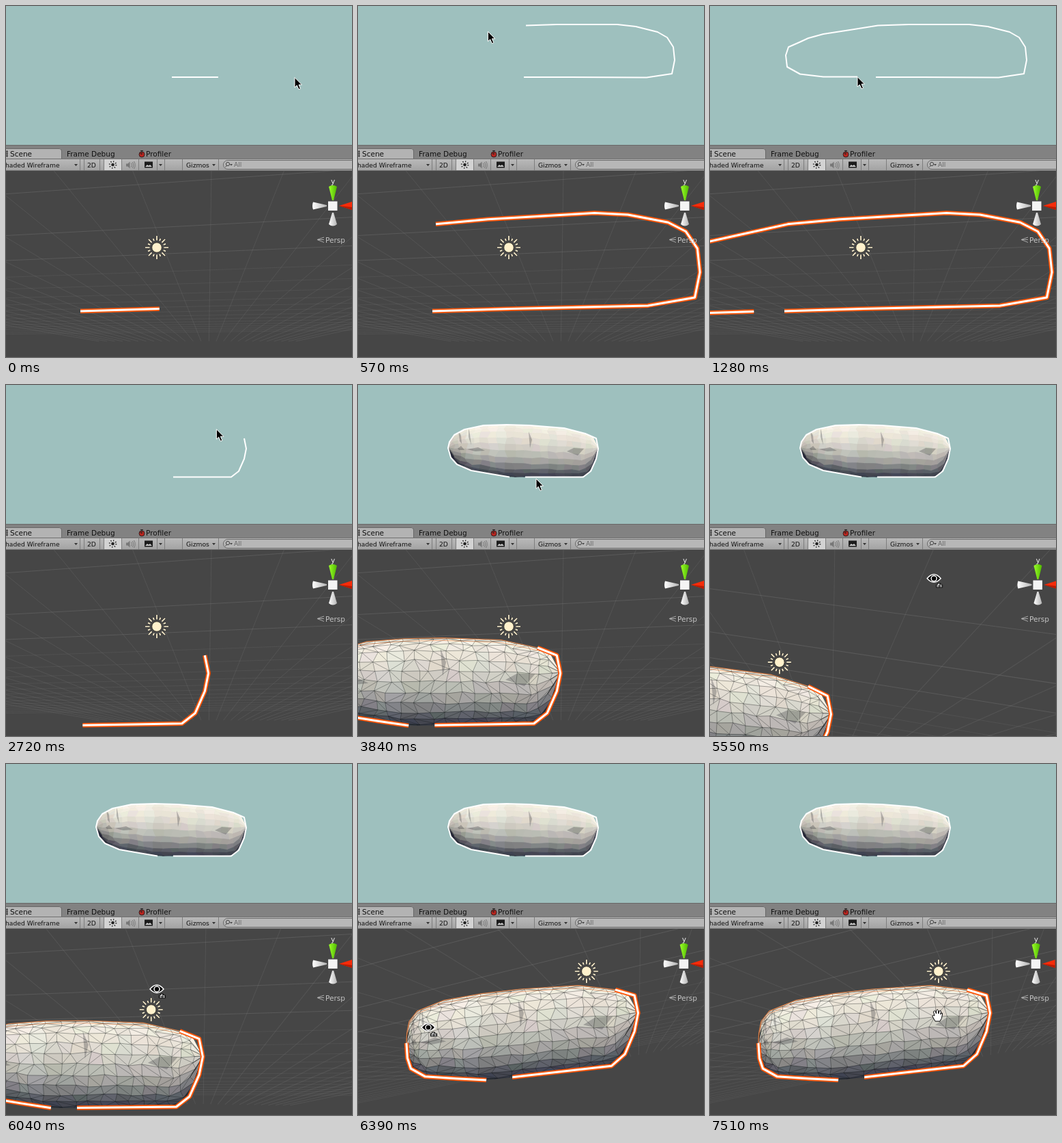
These frames come from a looping animation (507 by 513 pixels, 7.99 s). An HTML page with a canvas:

```html
<!DOCTYPE html>
<html lang="en">
<head>
<meta charset="utf-8">
<title>Sketch to mesh</title>
<style>
html, body { margin: 0; width: 100%; height: 100%; overflow: hidden; background: #464646; }
canvas, svg { position: absolute; left: 0; top: 0; width: 507px; height: 513px; }
text { font-family: "DejaVu Sans", sans-serif; font-size: 10.5px; fill: #111; }
.bar text { font-size: 9.2px; }
</style>
</head>
<body>
<canvas id="view" width="507" height="513"></canvas>
<svg viewBox="0 0 507 513">
  <defs>
    <linearGradient id="strip" x2="0" y2="1"><stop stop-color="#b9b9b9"/><stop offset="1" stop-color="#a2a2a2"/></linearGradient>
    <linearGradient id="cone"><stop stop-color="#fff"/><stop offset="1" stop-color="#b4b4b4"/></linearGradient>
    <linearGradient id="green"><stop stop-color="#9cff2a"/><stop offset="1" stop-color="#4fb800"/></linearGradient>
  </defs>
  <rect y="203" width="507" height="21" fill="#828282"/>
  <path d="M0 203.5H507" stroke="#686868"/>
  <path d="M0 208H78Q81 208 81 211V224H0Z" fill="#b3b3b3"/>
  <path d="M0 208.5H78Q81.500 208.500 81.500 212V224" fill="none" stroke="#686868"/>
  <path d="M0 213H3M0 216H3M0 219H3M1.500 211V221" stroke="#333"/>
  <text x="6" y="219.500">Scene</text>
  <text x="89" y="219.500">Frame Debug</text>
  <text x="205" y="219.500" font-size="11">Profiler</text>
  <circle cx="199" cy="217" r="4" fill="#b8241e" stroke="#3a2020"/>
  <path d="M197 211.500H201M199 212V217L196 214.500" stroke="#222" fill="none"/>
  <g class="bar">
    <rect y="224" width="507" height="17" fill="url(#strip)"/>
    <path d="M0 223.500H507M0 240.500H507" stroke="#707070"/>
    <rect x="144" y="224" width="25" height="16" fill="#d3d3d3"/>
    <path d="M108.500 224V240M114.500 224V240M137.500 224V240M143.500 224V240M169.500 224V240M194.500 224V240M221.500 224V240M232.500 224V240M258.500 224V240M311.500 224V240" stroke="#7d7d7d"/>
    <text x="-1" y="235.500">haded Wireframe</text>
    <text x="119" y="235.500">2D</text>
    <text x="264" y="235.500">Gizmos</text>
    <path d="M100 231h5l-2.500 3zM224 231h5l-2.500 3zM302 231h5l-2.500 3z" fill="#333"/>
    <circle cx="156.500" cy="232" r="2.300" fill="#222"/>
    <circle cx="156.500" cy="232" r="4.800" fill="none" stroke="#222" stroke-width="2" stroke-dasharray="1.200 2.570"/>
    <path d="M176 230.500h2.500l3-3v10l-3-3H176z" fill="#777"/>
    <path d="M183.500 229.500q2 3 0 6M185.500 228q3 4.500 0 9M187.500 227q3.500 5.500 0 11" fill="none" stroke="#777"/>
    <rect x="203" y="227.500" width="12" height="9" fill="#1c1c1c"/>
    <path d="M204 235l3-3 2 1.500 2-1.500 3 3z" fill="#ccc"/>
    <path d="M507 225.500H325a6.500 6.500 0 0 0 0 13H507" fill="#b7b7b7" stroke="#6a6a6a"/>
    <circle cx="325" cy="231" r="2.600" fill="none" stroke="#444"/>
    <path d="M323.500 233l-2 2.500" stroke="#444"/><path d="M328 231h4l-2 2.500z" fill="#444"/>
    <text x="334" y="235" style="fill:#666">All</text>
  </g>
  <g id="gizmo">
    <text x="476" y="259.500" style="fill:#eee">y</text>
    <path d="M473 264Q479 260 485 264L480 284H478Z" fill="url(#green)"/>
    <path d="M450 286.500Q448 292 450 297.500L470 293V291Z" fill="url(#cone)"/>
    <path d="M478 302H480L485 319Q479 324 473 319Z" fill="url(#cone)"/>
    <path d="M488 292L507 286V298Z" fill="#f52c0a"/><path d="M488 292L507 294V298Z" fill="#b81c04"/>
    <rect x="472" y="285.500" width="13.500" height="13.500" fill="#f4f4f4"/>
  </g>
  <path d="M466 338L456 341.500L466 345.500M466 341.500H456" fill="none" stroke="#a8a8a8"/>
  <text x="468" y="345.500" style="fill:#c4c4c4">Persp</text>
  <path id="arrow" d="M0 0V14.500L3.300 11.500L6 17.500L8.500 16.400L6 10.600H10.500Z" fill="#000" stroke="#fff"/>
  <g id="eye">
    <path d="M-10 0Q0 -12 10 0Q0 11 -10 0Z" fill="#000" stroke="#fff" stroke-width="1.400"/>
    <circle r="4" fill="#000" stroke="#fff" stroke-width="1.500"/>
    <path d="M5.500 7h4v2h3v4h-9v-4h2z" fill="#fff" stroke="#000"/>
    <path d="M8 7.500V13M4 11H12" stroke="#000"/>
  </g>
  <path id="hand" d="M-3 9L-7 2Q-7 -1 -4 1L-5.500 -5Q-4 -8 -2.500 -5L-1.500 -2L-1.500 -7Q0 -9.500 1.500 -7L1.700 -2L3 -6Q5 -8 5.500 -5L4.800 -1L6 -3Q8 -4 7.500 -1Q7 5 4 9Z" fill="#fff" stroke="#000"/>
</svg>
<script>
const LOOP = 7990;
const $ = id => document.getElementById(id);
const ctx = $('view').getContext('2d');

// start, end and number of steps of each burst of motion
const bursts = [[60, 800, 13], [860, 1280, 8], [1690, 2480, 13], [2540, 3310, 14], [3370, 3370, 1],
  [3550, 3550, 1], [3840, 4610, 13], [4670, 4780, 3], [5200, 5990, 14], [6040, 6500, 9], [6740, 7040, 5], [7400, 7510, 3]];

const strokeA = [[243, 104], [311, 104], [423, 104.5], [460, 99], [464, 79], [462, 60], [453, 46], [439, 38],
  [407, 30], [380, 27], [291, 27], [246, 28.5], [205, 35], [166, 41], [144, 47], [131, 53], [115, 60],
  [111, 72], [113, 89], [132, 99.5], [166, 103.5], [216, 103.5], [216, 103.5]];
const strokeB = [[245, 134.5], [290, 134.5], [330, 134.5], [341, 126], [349, 108], [352, 93], [349, 78], [333, 71],
  [302, 63], [252, 59], [218, 58], [184, 59], [156, 65], [141, 73], [134, 83], [132, 92], [136, 106],
  [145, 116], [166, 125], [195, 130], [222, 134.5], [228, 133]];

const drawA = [[0, 2], [800, 17], [1280, 22]];
const drawB = [[2300, 0], [2480, 3], [2718, 7.8], [3370, 21]];
const arrowPath = [[1280, 216, 103.5], [1690, 218, 106], [2300, 245, 134]];
const arrowExit = [[3370, 228, 133], [3800, 228, 133], [3840, 261, 137], [4250, 408, 180], [4610, 284, 238], [4780, 219, 319]];
const eyePath = [[5200, 215, 333], [5564, 328, 283], [5760, 372, 226], [6040, 221, 329], [6380, 103, 385]];
const handPath = [[6500, 138, 357], [6740, 138, 357], [7040, 240, 390], [7350, 240, 390], [7510, 333, 367]];

const mix = (a, b, p) => a.map((v, i) => v + (b[i] - v) * p);

function snap(t) {
  let out = 0;
  for (const [a, b, n] of bursts) {
    if (t < a) break;
    const d = (b - a) / (n - 1) || 1;
    out = a + Math.min(n - 1, Math.floor((t - a) / d + 0.3)) * d;
  }
  return out;
}

function keyed(table, t) {
  if (t <= table[0][0]) return table[0].slice(1);
  for (let i = 1; i < table.length; i++) {
    const a = table[i - 1], b = table[i];
    if (t <= b[0]) return mix(a, b, (t - a[0]) / (b[0] - a[0])).slice(1);
  }
  return table[table.length - 1].slice(1);
}

function pointAt(pts, i) {
  const k = Math.min(pts.length - 2, Math.floor(i));
  return mix(pts[k], pts[k + 1], Math.min(1, i - k));
}

// from the flat drawing into the tilted scene view
function toScene([x, y]) {
  const t = x - 243, far = Math.min(0, t + 67);
  return [109 + 1.67 * t + 0.00047 * t * t + 0.0143 * far * far,
    446 - 0.05 * t + (y - 104) * (1.68 + 0.0007 * t)];
}
const flat = p => p;

function trace(pts) {
  ctx.beginPath();
  pts.forEach(p => ctx.lineTo(p[0], p[1]));
}
function ink(color, width) {
  ctx.strokeStyle = color;
  ctx.lineWidth = width;
  ctx.stroke();
}

function random(seed) {
  return () => (seed = seed * 16807 % 2147483647) / 2147483647;
}

const tones = [[247, 243, 231], [230, 226, 214], [203, 200, 192], [152, 152, 149], [54, 58, 72]];

function buildMesh(stroke, cols, rows, seed) {
  const rnd = random(seed), pts = stroke.slice(0, -1), xs = pts.map(p => p[0]);
  const lo = Math.min(...xs), hi = Math.max(...xs), grid = [];
  for (let i = 0; i <= cols; i++) {
    const f = 0.7 * i / cols + 0.15 * (1 - Math.cos(Math.PI * i / cols));
    const x = lo + 0.3 + (hi - lo - 0.6) * f, hits = [];
    pts.forEach((a, n) => {
      const b = pts[(n + 1) % pts.length];
      if ((a[0] <= x) !== (b[0] <= x)) hits.push(a[1] + (b[1] - a[1]) * (x - a[0]) / (b[0] - a[0]));
    });
    const top = Math.min(...hits), bottom = Math.max(...hits), col = [];
    for (let j = 0; j <= rows; j++) {
      const v = 0.5 - 0.5 * Math.cos(Math.PI * j / rows), free = j % rows && i % cols ? 1 : 0;
      col.push([x + free * (rnd() - 0.5) * 6, top + (bottom - top) * v + free * (rnd() - 0.5) * 2]);
    }
    grid.push(col);
  }
  const cells = [];
  for (let i = 0; i < cols; i++) {
    const tint = (rnd() - 0.5) * 10 - Math.max(0, 3 - i) * 9;
    for (let j = 0; j < rows; j++) {
      const v = 0.5 - 0.5 * Math.cos(Math.PI * (j + 0.5) / rows);
      const k = Math.min(3, Math.floor(v * 4));
      const c = mix(tones[k], tones[k + 1], v * 4 - k).map(n => Math.round(n + tint + (rnd() - 0.5) * 7));
      cells.push({ quad: [grid[i][j], grid[i + 1][j], grid[i + 1][j + 1], grid[i][j + 1]],
        color: `rgb(${c})`, turn: rnd() < 0.5 ? 0 : 1 });
    }
  }
  return { pts, cells };
}

const meshA = buildMesh(strokeA, 26, 12, 77);
const meshB = buildMesh(strokeB, 20, 12, 41);
const creases = [[[146, 93], [151, 89], [156, 95], [148, 95]], [[160, 94], [176, 91], [186, 96], [172, 97]],
  [[306, 97], [316, 92], [331, 93], [322, 103]], [[147, 67], [151, 74], [152, 86], [149, 82]],
  [[162, 62], [164, 72], [166, 88], [162, 76]], [[250, 68], [255, 80], [252, 92]]];

function drawMesh(mesh, map, wired) {
  ctx.save();
  trace(mesh.pts.map(map));
  ctx.closePath();
  ctx.clip();
  const quads = mesh.cells.map(c => c.quad.map(map));
  mesh.cells.forEach((c, i) => {
    trace(quads[i]);
    ctx.closePath();
    ctx.fillStyle = c.color;
    ctx.fill();
    ink(c.color, 0.8);
  });
  if (mesh === meshB) {
    ctx.fillStyle = 'rgba(50,52,58,.3)';
    creases.forEach(c => { trace(c.map(map)); ctx.fill(); });
  }
  if (wired) {
    ctx.beginPath();
    mesh.cells.forEach(({ turn }, i) => {
      const q = quads[i];
      ctx.moveTo(...q[1]); ctx.lineTo(...q[0]); ctx.lineTo(...q[3]);
      ctx.moveTo(...q[turn]); ctx.lineTo(...q[turn + 2]);
    });
    ink('rgba(15,20,20,.55)', 0.6);
  }
  ctx.restore();
}

function glow(pts) {
  trace(pts.map(toScene));
  ink('#ff5608', 6.5);
  ink('#fff', 3);
}

function drawGrid() {
  for (let n = 2; n < 20; n++) {
    const y = x => 518 - 730 / n * (1 + 0.00029 * x);
    trace([[-300, y(-300)], [900, y(900)]]);
    ink(`rgba(150,150,150,${n < 6 ? 0.24 : 0.13})`, 1);
  }
  for (let m = -14; m <= 12; m++) {
    const x = 4 + m * (m < 0 ? 115 : 106);
    trace([[297 + x * 1.5, 104], [297 + x * 0.1, 490]]);
    ink('rgba(150,150,150,.17)', 1);
  }
}

function drawLight(x, y) {
  ctx.beginPath();
  for (let i = 0; i < 16; i++) {
    const c = Math.cos(i * Math.PI / 8), s = Math.sin(i * Math.PI / 8), r = i % 2 ? 14 : 17;
    ctx.moveTo(x + c * 10.5, y + s * 10.5);
    ctx.lineTo(x + c * r, y + s * r);
  }
  ink('#3a3833', 3);
  ink('#fff3d2', 1.7);
  ctx.beginPath();
  ctx.arc(x, y, 7.3, 0, 7);
  ctx.fillStyle = '#fff1cc';
  ctx.fill();
  ink('#38352e', 1);
}

function place(id, pos) {
  $(id).style.display = pos ? '' : 'none';
  if (pos) $(id).setAttribute('transform', `translate(${pos[0].toFixed(2)} ${pos[1].toFixed(2)})`);
}

function render(raw) {
  const t = snap(raw), first = t < 2300;
  const stroke = first ? strokeA : strokeB;
  const index = keyed(first ? drawA : drawB, t)[0];
  const last = Math.min(stroke.length - 2, Math.floor(index - 1));
  const line = stroke.slice(0, Math.max(0, last) + 1);
  const mesh = t >= 3550 ? meshB : t >= 1690 && first ? meshA : null;

  const eye = t >= 5200 ? keyed(eyePath, t) : [213, 335];
  const u = (213 - eye[0]) * 1.035, v = 335 - eye[1], skew = -0.1 * u / 118;
  const pose = k => ctx.setTransform(1, k, 0, 1, u, v - k * 221);

  ctx.setTransform(1, 0, 0, 1, 0, 0);
  ctx.lineJoin = 'round';
  ctx.fillStyle = '#464646';
  ctx.fillRect(0, 203, 507, 310);
  ctx.fillStyle = '#9ec0be';
  ctx.fillRect(0, 0, 507, 203);
  if (mesh) drawMesh(mesh, flat, false);
  trace(line);
  ink('#fff', 2);

  ctx.save();
  ctx.beginPath();
  ctx.rect(0, 241, 507, 272);
  ctx.clip();
  pose(skew * 2);
  drawGrid();
  pose(skew);
  if (mesh) {
    drawMesh(mesh, toScene, true);
    const [a, b] = first ? [9, 18] : [7, 15];
    const rim = line.slice(a, b + 1);
    trace(rim.map(toScene));
    ink('#d9804a', 1.2);
    trace(rim.map(([x, y]) => toScene([x, y + 2.2])));
    ink('rgba(226,120,60,.7)', 0.8);
    glow(line.slice(0, a + 1));
    glow(line.slice(b));
  } else glow(line);
  ctx.setTransform(1, 0, 0, 1, 0, 0);
  drawLight(221 + u, 353 + v);
  ctx.restore();

  const arrow = t < 1690 || (t >= 2300 && t < 3370) ? pointAt(stroke, index)
    : first ? keyed(arrowPath, t) : keyed(arrowExit, t);
  place('gizmo', [-u * 0.012, 0]);
  place('arrow', t < 5200 && arrow);
  place('eye', t >= 5200 && t < 6495 && eye);
  place('hand', t >= 6495 && keyed(handPath, t));
}

function tick(now) {
  render(now % LOOP);
  requestAnimationFrame(tick);
}
render(0);
requestAnimationFrame(tick);
</script>
</body>
</html>
```
